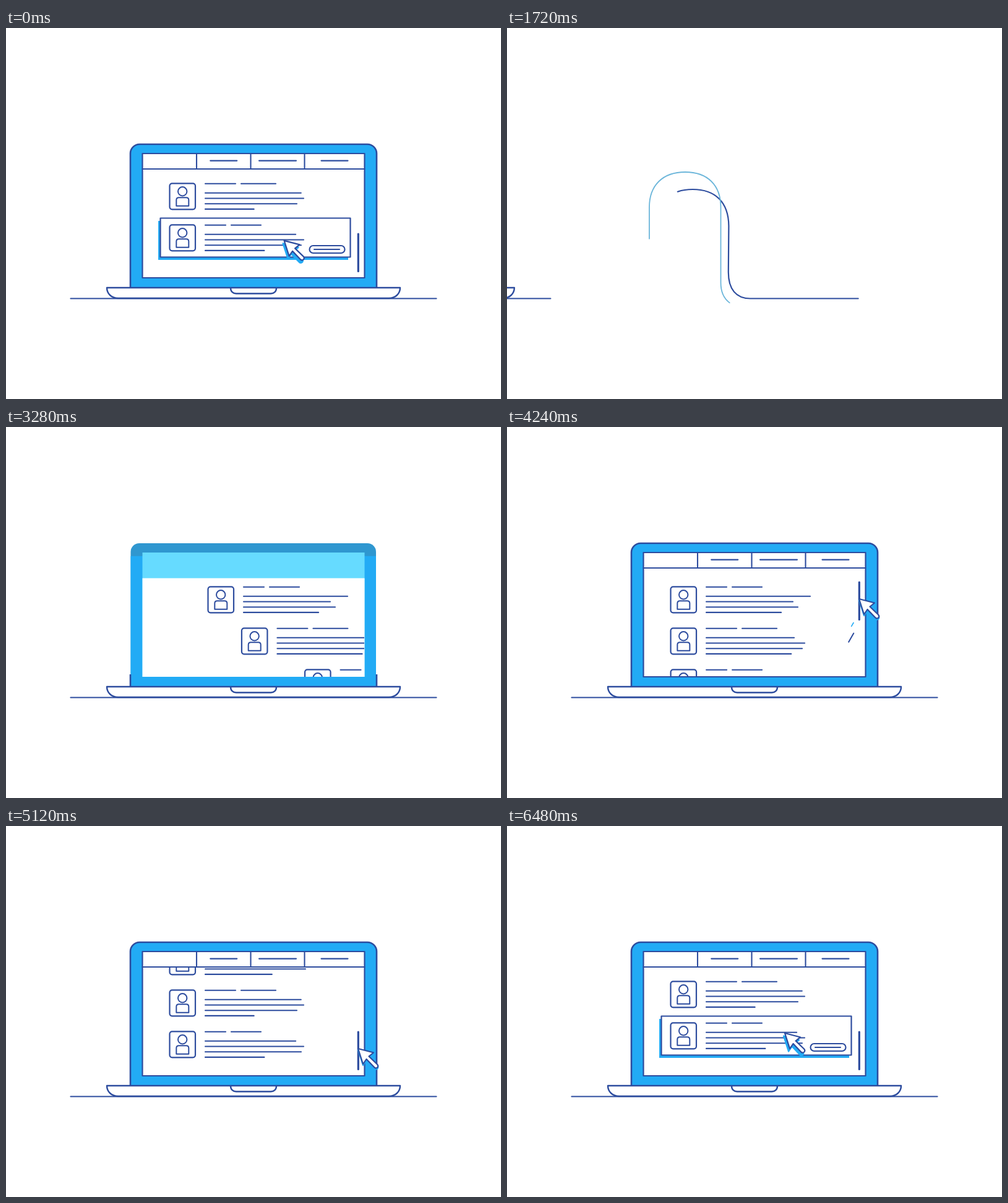
Write an HTML page with a canvas that moves like this. It is 800 by 600 pixels and loops after 6520 ms.

```html
<!DOCTYPE html>
<html>
<head>
<meta charset="utf-8">
<style>
  html, body { margin: 0; width: 100%; height: 100%; overflow: hidden; background: #fff; }
  canvas { display: block; }
</style>
</head>
<body>
<canvas id="stage" width="800" height="600"></canvas>
<script>
const c = document.getElementById('stage').getContext('2d');
const LOOP = 6520, STEP = 40, RISE = 446, ROWS = 5;
const NAVY = '#2d4c9e', BLUE = '#22abf5', DARK = '#2f97d0', CYAN = '#66dbff', PALE = '#6cb6da';

const lid = new Path2D('M201 419V203a15 15 0 0 1 15-15H584a15 15 0 0 1 15 15V419');
const base = new Path2D('M163 420H637C637 430 629 437 619 437H181C171 437 163 430 163 420Z');
const notch = new Path2D('M363 420.5C363 426 367 429.5 372 429.5H428C433 429.5 437 426 437 420.5');
const torso = new Path2D('M10.8 36.5V27q0-4 4-4h12q4 0 4 4v9.5z');
const pointer = new Path2D('M0 0L25 6.5L17.5 12.5L31 25.5q2.5 3 0 5.2q-2.5 2-5-.6L13.5 17L8 25Z');
const loopNavy = new Path2D('M820 437.5H393C370 437.5 357.8 422 357.8 395L358.4 320C358 282 337 261 300 261' +
  'C263 261 242 282 242 320V395C242 422 230 437.5 207 437.5H-60');
const loopPale = new Path2D('M820 451.5H383C360 451.5 345.5 436 345.5 412V290C345.5 254 324 233 288 233' +
  'C252 233 230 254 230 290V412C230 436 216 451.5 193 451.5H-60');
const flatPale = new Path2D('M820 438.8H300');
const trailNavy = new Path2D('M520 404L580 299');
const trailPale = new Path2D('M510 404L570 299');

const clamp = x => Math.max(0, Math.min(1, x));
const part = (t, from, dur) => clamp((t - from) / dur);
const inOut = p => p < .5 ? 4 * p ** 3 : 1 - 4 * (1 - p) ** 3;
const ease = (t, from, dur) => inOut(part(t, from, dur));
const mix = (a, b, p) => a + (b - a) * p;

function line(x1, y1, x2, y2, w = 2.1) {
  if (x1 === x2 && y1 === y2) return;
  c.lineWidth = w;
  c.beginPath();
  c.moveTo(x1, y1);
  c.lineTo(x2, y2);
  c.stroke();
}

function box(x, y, w, h, r, fill) {
  c.beginPath();
  c.roundRect(x, y, w, h, r);
  if (fill) { c.fillStyle = fill; c.fill(); }
}

function scaled(x, y, sx, sy, draw) {
  if (!sx || !sy) return;
  c.save();
  c.translate(x, y);
  c.scale(sx, sy);
  c.translate(-x, -y);
  draw();
  c.restore();
}

// Strokes only the stretch of a path from tail to head
function dash(path, color, width, tail, head) {
  if (head - tail < .5) return;
  c.save();
  c.strokeStyle = color;
  c.lineWidth = width;
  c.setLineDash([head - tail, 9999]);
  c.lineDashOffset = -tail;
  c.stroke(path);
  c.restore();
}

function drawRow(i, x, y) {
  c.save();
  c.translate(264.5 + x, y);
  c.lineWidth = 2.2;
  box(0, 0, 41.5, 42, 4);
  c.stroke();
  c.lineWidth = 2;
  c.beginPath();
  c.arc(20.7, 13, 7.2, 0, 7);
  c.stroke();
  c.stroke(torso);

  c.translate(57.5, .5);
  const odd = i % 2, first = 33 + 16 * odd, second = 48 + 8 * odd;
  line(0, 0, first, 0);
  line(first + 9, 0, first + 9 + second, 0);
  const widths = [
    154 + 14 * Math.cos(2.6 * i),
    Math.min(159, 140 + 19 * i),
    148 + 7 * (i % 3),
    108 + 30 * Math.sin(1.35 * i + .45)
  ];
  widths.forEach((w, j) => line(0, 15 + j * 8.7, w, 15 + j * 8.7));
  c.restore();
}

function drawCard(t) {
  const k = ease(t, 5600, 300), lift = ease(t, 5780, 240);
  scaled(403, 339, k, k, () => {
    box(249.5 - 3.5 * lift, 307.5 + 4.5 * lift, 307, 63, 0, BLUE);
    box(249.5, 307.5, 307, 63, 0, '#fff');
    c.lineWidth = 2.2;
    c.stroke();
  });
}

function drawButton(t) {
  const k = ease(t, 5960, 260) * mix(1, .92, ease(t, 7400, 80));
  scaled(519, 358, k, k, () => {
    c.lineWidth = 2.2;
    box(490.5, 352, 57, 12, 6, '#fff');
    c.stroke();
    line(498, 358, 539, 358);
  });
}

function drawTabs(k) {
  line(220.5, 228, mix(220.5, 579.5, k), 228);
  const edges = [308, 395.5, 482.5, 579.5];
  for (let i = 0; i < 3; i++) {
    const mid = (edges[i] + edges[i + 1]) / 2, half = 21.5 + 8.5 * (i % 2);
    line(edges[i], 203, edges[i], mix(203, 228, k));
    line(mid - half, 214.6, mid - half + 2 * half * k, 214.6);
  }
}

function drawScreen(t) {
  const whiteTop = mix(404, 203, ease(t, 3000, RISE));
  const cyanTop = mix(404, 203, ease(t, 2840, RISE));
  box(220.5, cyanTop, 359, 404 - cyanTop, 0, CYAN);
  box(220.5, whiteTop, 359, 404 - whiteTop, 0, '#fff');

  c.save();
  const top = Math.max(whiteTop, 228);
  box(220.5, top, 358.5, 404 - top, 0);
  c.clip();
  drawCard(t);
  const scroll = 208 * ease(t, 4400, 968);
  for (let i = 0; i < ROWS; i++) {
    const slide = 62 * Math.exp((3280 + 80 * i - t) / 127);
    drawRow(i, slide, 258.3 + i * 67 - scroll);
  }
  drawButton(t);
  c.restore();

  const edge = ease(t, 3300, 360), tabs = ease(t, 3340, 380);
  if (edge) {
    c.save();
    c.lineWidth = 2.2;
    c.setLineDash([edge * 1121, 2000]);
    c.beginPath();
    c.rect(220.5, 203, 359, 201);
    c.stroke();
    c.restore();
  }
  if (tabs) drawTabs(tabs);

  const bar = 251 + 82 * ease(t, 4400, 680);
  line(569.3, bar, 569.3, bar + 60.5 * ease(t, 3660, 300), 3.2);
}

function drawLid(t) {
  c.save();
  box(201.5, 188, 396.5, 260, 14);
  c.clip();
  const fill = (from, color) => {
    const y = mix(419, 188, ease(t, from, RISE));
    box(200, y, 400, 419 - y, 0, color);
  };
  fill(2800, DARK);
  fill(2960, BLUE);
  c.restore();

  // The outline grows from both feet and meets at the top
  const k = ease(t, 3180, RISE) * 424;
  if (!k) return;
  c.save();
  c.lineCap = 'butt';
  c.lineWidth = 2.6;
  if (k < 423) c.setLineDash([k, 847 - 2 * k, k, 9999]);
  c.stroke(lid);
  c.restore();
}

function drawPointer(t) {
  const k = ease(t, 4070, 140), lift = ease(t, 5200, 240);
  // Drag the bar, fly to the row, then swing down to the button
  const x = 569 - 120 * ease(t, 5200, 1000) + 66 * ease(t, 6450, 550);
  const y = 278 + 82 * ease(t, 4400, 680) - 46 * ease(t, 5300, 900) + 45 * ease(t, 6212, 548);
  const arrow = (dx, dy, fill, edge) => {
    c.save();
    c.translate(x + dx, y + dy);
    c.fillStyle = fill;
    c.strokeStyle = edge;
    c.lineWidth = 2.2;
    c.fill(pointer);
    c.stroke(pointer);
    c.restore();
  };
  scaled(x, y, k, k, () => {
    arrow(-2 * lift, 2 + 2.5 * lift, BLUE, BLUE);
    arrow(0, 0, '#fff', NAVY);
  });
}

function drawLaptop(t) {
  drawLid(t);
  drawScreen(t);
  scaled(400, 437, ease(t, 2740, 300), 1, () => {
    c.fillStyle = '#fff';
    c.lineWidth = 2.4;
    c.fill(base);
    c.stroke(base);
    c.stroke(notch);
  });
  const since = t - 3960;
  dash(trailNavy, NAVY, 2, 90 * part(since, 0, 330) ** 2, Math.min(90, .29 * since));
  dash(trailPale, BLUE, 1.6, 105 * part(since, 0, 296) ** 2, Math.min(105, .36 * since));
  drawPointer(t);
}

function drawSwirl(t) {
  const since = t - 1040;
  if (t < 2080) dash(loopNavy, NAVY, 2.2, 112 + 768 * part(since, 0, 1040) ** 4, 153 + .78 * since);
  dash(flatPale, PALE, 1.8, 60 + 340 * part(since, 0, 560) ** 3, Math.min(400, 112 + .52 * since));
  dash(loopPale, PALE, 1.8, 70 + 1101 * part(since, 0, 1140) ** 2, Math.min(1171, 122 + 1.078 * since));
}

function draw(t) {
  c.clearRect(0, 0, 800, 600);
  c.strokeStyle = NAVY;
  c.lineCap = c.lineJoin = 'round';
  const leaving = t < 2080;
  c.save();
  if (leaving) c.translate(-17.07 * Math.max(0, (t - 747) / 293) ** 3, 0);
  line(104.5, 437.5, leaving ? 695.5 : mix(215, 695.5, ease(t, 2080, 560)), 437.5, 2.2);
  // The exit continues the state reached at the end of the loop
  if (leaving || t > 2740) drawLaptop(leaving ? t + LOOP : t);
  c.restore();
  drawSwirl(t);
}

function tick() {
  const t = performance.now() % LOOP;
  draw(t - t % STEP);
  requestAnimationFrame(tick);
}
tick();
</script>
</body>
</html>
```
